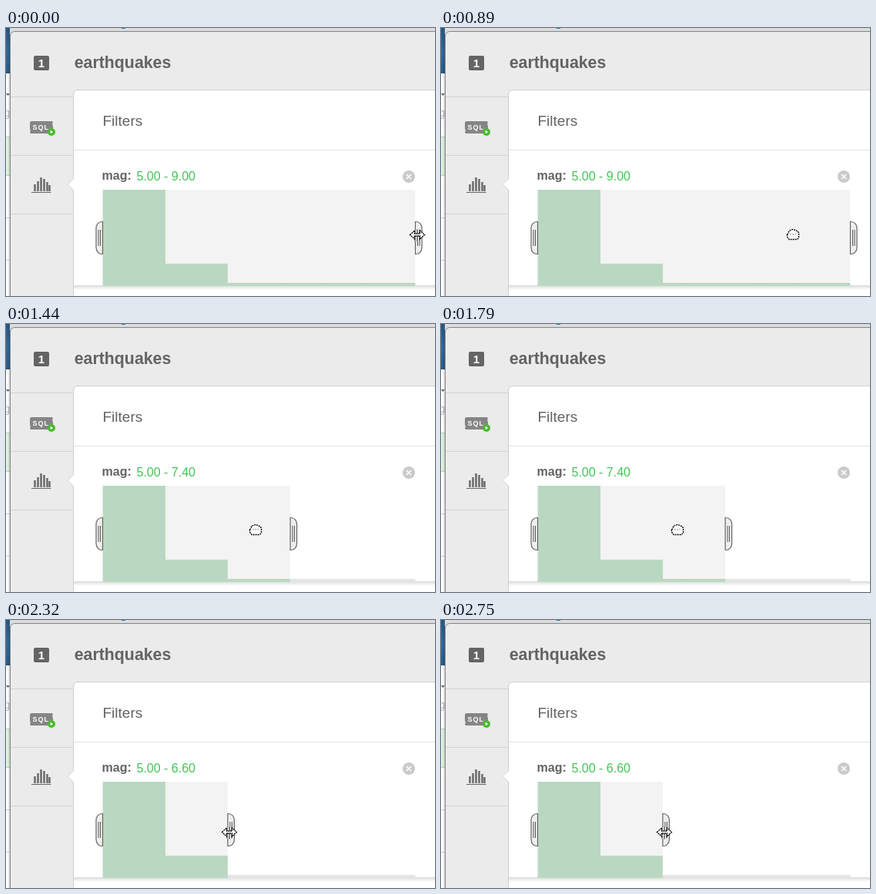
Animation, 557 px wide and 348 px high, one loop 2790 ms. Source, as an HTML page:

```html
<!DOCTYPE html>
<html lang="en">
<head>
<meta charset="utf-8">
<title>Magnitude filter</title>
<style>
  html, body { margin: 0; width: 100%; height: 100%; overflow: hidden; background: #fff; }
  svg { display: block; }
  text { font-family: "Liberation Sans", Arial, sans-serif; fill: #636363; }
  .bold { font-weight: bold; }
  .rule { stroke: #d2d2d2; fill: none; }
  .handle { fill: #eee; stroke: #666; stroke-width: 1.2; }
  .cursor { fill: #fff; stroke: #000; stroke-width: 1.3; }
</style>
</head>
<body>
<svg width="557" height="348" viewBox="0 0 557 348">
  <defs>
    <linearGradient id="sea" x2="0" y2="1">
      <stop stop-color="#27567f"/><stop offset=".5" stop-color="#2f6b9c"/><stop offset="1" stop-color="#275a87"/>
    </linearGradient>
    <linearGradient id="shade">
      <stop stop-color="#000" stop-opacity="0"/><stop offset="1" stop-color="#000" stop-opacity=".22"/>
    </linearGradient>
    <linearGradient id="fade" x2="0" y2="1">
      <stop stop-color="#dadada"/><stop offset="1" stop-color="#fff"/>
    </linearGradient>
    <clipPath id="range"><rect id="span" x="125.5" y="210" width="406" height="125"/></clipPath>
    <g id="bars">
      <path d="M125.5 210H207V306H288V331H531.5V335H125.5Z"/>
    </g>
    <g id="grip">
      <path class="handle" d="M0 251.5H1C5 251.5 8.5 255 8.5 260V285C8.5 290 5 293.5 1 293.5H0Z"/>
      <path d="M3 262V283M5.5 262V283" stroke="#555"/>
    </g>
  </defs>

  <!-- page behind the panel -->
  <rect width="557" height="348" fill="#fff"/>
  <rect width="30" height="59" fill="url(#sea)"/>
  <g id="page">
    <path d="M0 85H5L2.5 88Z" fill="#666"/>
    <text x="-3" y="115" font-size="15" style="fill:#bbb">g</text>
    <rect x="-2" y="141.5" width="12" height="50" fill="#e0f3df" stroke="#b5d9b4"/>
    <path class="rule" d="M0 246.5H6M0 301.5H6"/>
  </g>

  <g id="panel">
    <rect x="5" width="580" height="12" fill="#dcdcdc"/>
    <rect x="150" width="5" height="1" fill="#1b7fc4"/>
    <rect x="2" y="8" width="4" height="340" fill="url(#shade)"/>
    <path d="M5.5 350V11Q5.5 4.5 12 4.5H600V350Z" fill="#ebebeb" stroke="#858585"/>
    <path class="rule" d="M6 89.5H88M6 165.5H88M6 241.5H88"/>

    <path d="M87.5 350V87Q87.5 80.5 94 80.5H600V350Z" fill="#fff" stroke="#cfcfcf"/>
    <path d="M88.5 195L80 203L88.5 211" fill="#fff" stroke="#d5d5d5"/>
    <rect x="87.5" y="196" width="3" height="14" fill="#fff"/>
    <path class="rule" d="M88 158.5H600" style="stroke:#e2e2e2"/>
    <rect x="88" y="334" width="510" height="6" fill="url(#fade)"/>

    <rect x="36" y="36" width="20" height="19" rx="2" fill="#646464"/>
    <text class="bold" x="46" y="51" font-size="15" text-anchor="middle" style="fill:#fff">1</text>
    <text class="bold" x="88.7" y="52" font-size="21.33">earthquakes</text>
    <text x="125.5" y="127" font-size="19">Filters</text>
    <text class="bold" x="124.5" y="197" font-size="16">mag:</text>
    <text id="value" x="169.5" y="198" font-size="16" style="fill:#40c555"></text>

    <path d="M32 121H60L61 123L60 125L61 127V135L60 137H32L31 135L32 133L31 131V123Z" fill="#858585"/>
    <text class="bold" x="34.5" y="132" font-size="9" letter-spacing="1" style="fill:#fff">SQL</text>
    <circle cx="59" cy="135" r="5" fill="#4cb82f"/>
    <path d="M57.7 132.8L61.2 135L57.7 137.2Z" fill="#fff"/>
    <path d="M37.5 212V203M41.5 212V199M45.5 212V194M49.5 212V196M53.5 212V200M56.5 212V204" stroke="#666" stroke-width="2.4"/>
    <path d="M33 213.5H58.5" stroke="#666"/>

    <circle cx="523" cy="193" r="8" fill="#cbcbcb"/>
    <path d="M520 190L526 196M526 190L520 196" stroke="#fff" stroke-width="1.6"/>

    <use href="#bars" fill="#e5e5e5"/>
    <g clip-path="url(#range)">
      <rect x="125.5" y="210" width="406" height="125" fill="#f3f3f3"/>
      <use href="#bars" fill="#bad8c1"/>
    </g>
    <use href="#grip" transform="translate(125.5) scale(-1 1)"/>
    <use id="right" href="#grip"/>
  </g>

  <g id="cursor">
    <g id="arrows">
      <g id="ticks" fill="none">
        <path d="M-3-6V8M0-7V9M3-6V8" stroke="#fff" stroke-width="3"/>
        <path d="M-3-6V8M0-7V9M3-6V8" stroke="#000"/>
      </g>
      <path class="cursor" stroke-dasharray="2 .8" d="M-9.5 0L-3.5-5.5V-1.5H3.5V-5.5L9.5 0L3.5 5.5V1.5H-3.5V5.5Z"/>
    </g>
    <g id="fist">
      <path class="cursor" stroke-dasharray="2 1" d="M-7.5 0L-5.5-2V-4L-3-5.5L0-6.5L3-5.5L6-4L7.5-2V4L5.5 6.5H-5L-7.5 3Z"/>
      <path d="M-3-1.5V1M0-1.5V1M3-1.5V1" stroke="#999"/>
    </g>
  </g>
</svg>
<script>
const LOOP = 2790, LEFT = 125.5, BIN = 81.2;
const el = id => document.getElementById(id);
const show = (id, on) => el(id).setAttribute("display", on ? "inline" : "none");
const move = (id, x, y = 0) => el(id).setAttribute("transform", `translate(${x} ${y})`);

// Progress from a to b in n equal steps
const steps = (t, a, b, n) =>
  Math.min(1, Math.max(0, Math.floor((t - a) / (b - a) * n + 1e-6) / n));
const smooth = u => u * u * (3 - 2 * u);

function draw(t) {
  const drag = steps(t, 650, 1210, 14);
  const drift = steps(t, 1202, 1680, 10);
  const settle = steps(t, 1750, 2070, 8);
  const x = Math.round(534 - 195 * smooth(drag) - 30 * drift - 19 * settle);
  const y = Math.round(268 - drag + 8 * settle * settle);
  const bins = Math.ceil((x - 129) / BIN);
  const grabbing = t >= 730 && t < 2320;
  const nudged = t >= 2550 && t < 2750;

  el("value").textContent = `5.00 - ${(5 + bins * 0.8).toFixed(2)}`;
  el("span").setAttribute("width", bins * BIN);
  move("right", LEFT + bins * BIN);
  move("panel", nudged ? 15 : 0);
  move("cursor", x, y + (grabbing ? 0 : 0.5));
  show("page", !nudged);
  show("fist", grabbing);
  show("arrows", !grabbing);
  show("ticks", !nudged);
}

const start = performance.now();
function frame() {
  draw((performance.now() - start) % LOOP);
  requestAnimationFrame(frame);
}
frame();
</script>
</body>
</html>
```
